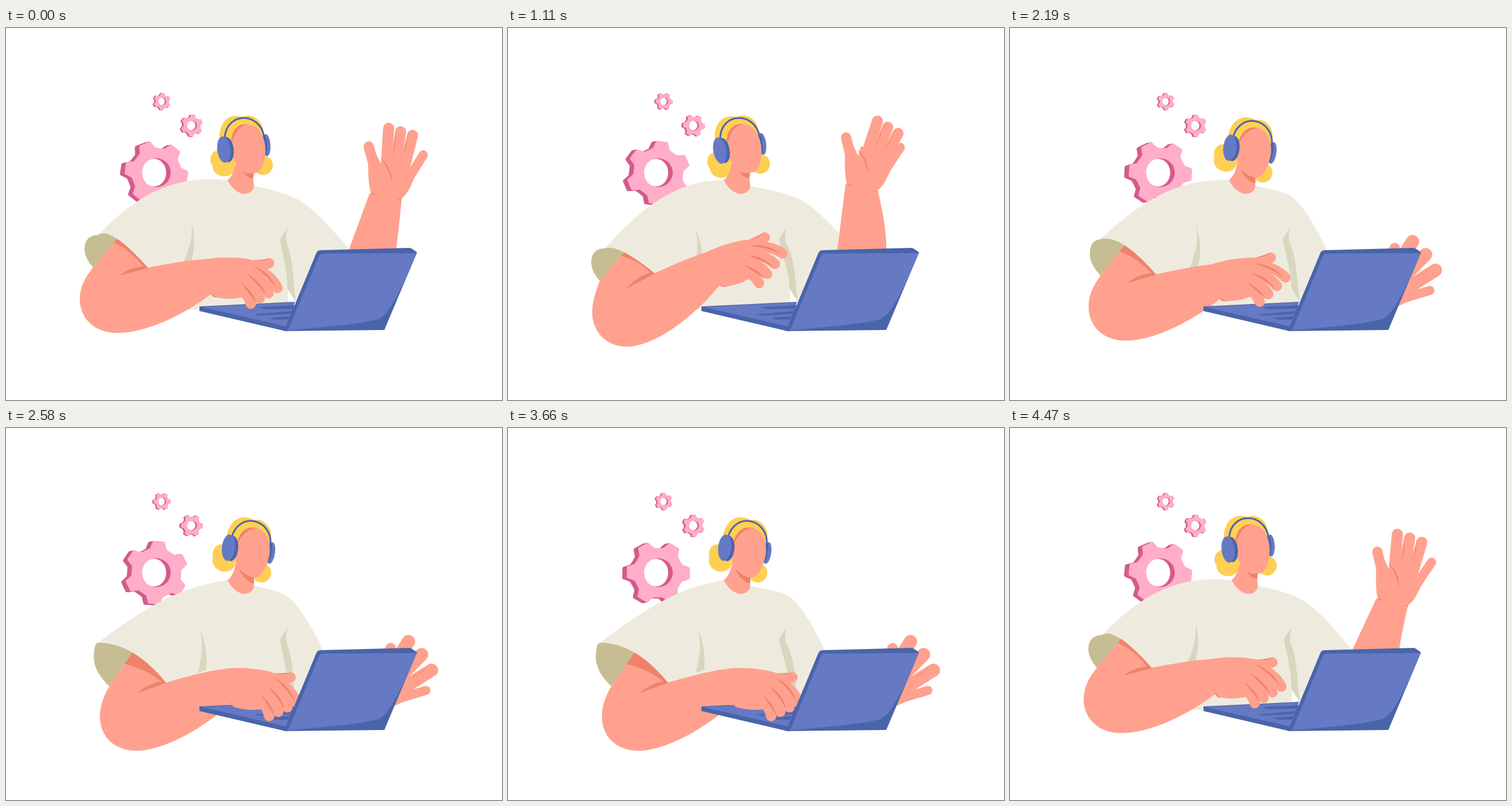
Write an HTML page with a canvas that moves like this. It is 864 px wide and 648 px high and loops after 4500 ms.

```html
<!DOCTYPE html>
<html lang="en">
<head>
<meta charset="utf-8">
<title>Support desk</title>
<style>
html, body { margin: 0; width: 100%; height: 100%; overflow: hidden; background: #fff; }
canvas { display: block; }
</style>
</head>
<body>
<canvas id="stage" width="864" height="648"></canvas>
<script>
const ctx = document.getElementById('stage').getContext('2d');
const LOOP = 4500;
const SKIN = '#ffa18e', SHADE = '#f0826a', SHIRT = '#eeebde', FOLD = '#d9d6c0', CUFF = '#c6bd93';
const HAIR = '#ffcf54', BLUE = '#6679c4', NAVY = '#4a64aa', PINK = '#ffadc8', ROSE = '#d45b8d';

const rad = deg => deg * Math.PI / 180;

function ease(u) {
  u = Math.min(1, Math.max(0, u));
  return u * u * (3 - 2 * u);
}

// Eases from 0 to 1 over a..b, stays, and eases back over c..d (d may pass the loop end).
function hold(t, a, b, c, d) {
  if (t < a) t += LOOP;
  return ease((t - a) / (b - a)) - ease((t - c) / (d - c));
}

function pose(t) {
  return {
    lift: hold(t, 0, 450, 1050, 1800),
    tilt: hold(t, 0, 480, 600, 1100),
    away: hold(t, 600, 1100, 1150, 1650),
    low: hold(t, 1150, 1700, 4050, 4590),
    reach: hold(t, 2000, 2500, 2650, 3150) + hold(t, 3300, 3650, 3750, 4250),
    lean: -10 * (hold(t, 100, 700, 1900, 2450) + hold(t, 2900, 3500, 3750, 4300))
  };
}

function fill(color, d) {
  ctx.fillStyle = color;
  ctx.fill(new Path2D(d));
}

function line(color, width, d) {
  ctx.strokeStyle = color;
  ctx.lineWidth = width;
  ctx.lineCap = ctx.lineJoin = 'round';
  ctx.stroke(new Path2D(d));
}

function oval(color, x, y, rx, ry, tilt = 0) {
  ctx.fillStyle = color;
  ctx.beginPath();
  ctx.ellipse(x, y, rx, ry, rad(tilt), 0, 7);
  ctx.fill();
}

// Thin tapered line.
function crease(x0, y0, cx, cy, x1, y1, w = 5) {
  fill(SHADE, `M${x0} ${y0}Q${cx} ${cy} ${x1} ${y1}Q${cx - w} ${cy + w} ${x0} ${y0}Z`);
}

// Moves pivot (px,py) to (x,y), turned by an angle.
function placed(x, y, deg, px, py, draw) {
  ctx.save();
  ctx.translate(x, y);
  ctx.rotate(rad(deg));
  ctx.translate(-px, -py);
  draw();
  ctx.restore();
}

// Point (a,b) in a frame at (x,y) turned by an angle.
function local(x, y, deg, a, b) {
  const c = Math.cos(rad(deg)), s = Math.sin(rad(deg));
  return [x + a * c - b * s, y + a * s + b * c];
}

function gear(x, y, size, deg) {
  const at = (r, a) => local(0, 0, a, r, 0).join(' ');
  let d = '';
  for (let i = 0; i < 6; i++) {
    const a = deg + i * 60;
    d += `${i ? 'L' : 'M'}${at(42, a - 17)}L${at(53, a - 9)}L${at(53, a + 9)}L${at(42, a + 17)}Q${at(40, a + 30)} ${at(42, a + 43)}`;
  }
  d += 'Z';
  ctx.save();
  ctx.translate(x, y);
  ctx.scale(size, size);
  for (let depth = 8; depth >= 0; depth--) {
    const color = depth ? ROSE : PINK;
    ctx.save();
    ctx.translate(-depth, depth / 5);
    fill(color, d);
    line(color, 5, d);
    ctx.restore();
  }
  oval(ROSE, 0, 0, 25, 25);
  oval('#fff', -4, 0, 21, 24);
  ctx.restore();
}

// Everything on the left arm hangs on the elbow crease.
function leftArm({ lift, low, reach, away, tilt }) {
  const x = 198 + 8 * lift + 36 * reach - 5 * low;
  const y = 431 + 24 * lift + 26 * reach + 5 * low;
  const turn = -14 * lift - 5 * reach;
  const raise = away + low * (1 - reach);
  const top = [x - 37 - 32 * reach, y - 71 - 17 * reach];
  const edge = [x - 4 - 5 * reach, y - 64 - 7 * reach];
  const armpit = [x + 50, y - 13 + turn];
  const bend = edge.map((e, i) => 2 * e - (top[i] + armpit[i]) / 2);
  const towards = p => p.map((v, i) => (v + bend[i]) / 2);
  return {
    x, y, turn, raise, top, edge, armpit, bend,
    left: [x - 61 - 15 * reach, y - 45 - 16 * reach],
    under: [x - 46 - 3 * reach, y - 14 + 2 * reach],
    upper: `Q${towards(top)} ${top}`,
    lower: `Q${towards(armpit)} ${armpit}`,
    depth: .13 + .21 * reach,
    wrist: local(x, y, turn, 160, 31),
    handTurn: -20 * raise - 6 * tilt + 3 * reach
  };
}

function shirt({ lift, low, reach, lean, tilt }, arm) {
  const nx = 386 + lean, ny = 265 + 4 * tilt;
  fill(SHIRT, `M${arm.top}C${215 + 12 * reach} ${305 + 30 * lift + 20 * reach} ${280 + 10 * reach} ${253 + 11 * lift + 25 * reach} ${nx} ${ny}
    L${nx + 46} ${ny + 10}
    C${nx + 80} ${ny + 17} ${495 - 20 * low} ${290 - 5 * low} ${515 - 25 * low} ${302 - 9 * low}
    C${545 - 33 * low} ${322 - 12 * low} ${575 - 40 * low} ${355 - 5 * low} ${602 - 49 * low} ${386 + 4 * low}
    L545 450L505 478L491 ${455 + 23 * low}V482L337 491H318L${arm.armpit}Q${arm.bend} ${arm.top}Z`);
  placed(323 + .7 * lean + 10 * lift + 14 * reach, 338 + 11 * lift + 8 * reach + 4 * low, -10 * (lift + reach), 0, 0,
    () => fill(FOLD, 'M0 0C6 22 7 45-1 72L-16 75C-3 45 3 25 0 0Z'));
  const x = 491 + lean / 2, y = 347;
  fill(FOLD, `M${x} ${y}L${x - 14} ${y + 20}C${x - 8} ${y + 55} 490 420 490 453L505 477C499 430 500 400 ${x - 3} ${y + 25}Q${x - 4} ${y + 16} ${x} ${y}Z`);
}

function head({ lean, low, tilt, away }) {
  const turn = 14 * low + 3 * tilt - 2 * away;
  const x = 422 + lean + 8 * low, y = 209 + 7 * low + 4 * tilt;
  placed(x, y, turn * 1.4, 422, 209, () => {
    oval(HAIR, 370, 230, 14, 16);
    oval(HAIR, 380, 242, 20, 17);
    oval(HAIR, 448, 238, 17, 17);
  });
  ctx.save();
  ctx.translate(386 + lean, 265 + 4 * tilt);
  fill(SKIN, 'M0 0C8-7 13-17 14-32L46-32C44-15 44-3 46 10C44 28 16 32 0 0Z');
  fill(SHADE, `M${27 - 7 * low} ${-16 - 3 * low}Q36 -8 46 ${-14 + 8 * low}L${44 + 2 * low} ${-3 + 9 * low}Q${32 - 3 * low} ${-5 + 6 * low} ${27 - 7 * low} ${-16 - 3 * low}Z`);
  ctx.restore();
  placed(x, y, turn, 422, 209, () => {
    fill(HAIR, 'M371 192C370 165 385 152 402 153Q409 154 412 154C420 150 430 153 436 158C446 165 448 178 449 195L440 215L397 236L380 230Z');
    oval(BLUE, 453, 203, 7, 19, -5);
    oval(NAVY, 450, 203, 4, 18, -5);
    fill(SKIN, 'M391 205C391 180 402 167 418 167C436 167 448 183 451 205C453 230 446 252 433 252C412 253 392 235 391 205Z');
    fill(SHADE, 'M391 207C390 180 401 166 419 167C405 171 396 183 391 207Z');
    line(NAVY, 3, 'M380 192C382 145 442 145 449 190');
    oval(NAVY, 385, 212, 11, 22, -8);
    oval(BLUE, 379, 212, 11.5, 23, -8);
  });
}

function wavingArm({ low, tilt, away }) {
  const x = 660 + 5 * tilt - 35 * away + 140 * low * (1 - low) + 3 * low;
  const y = 245 + 8 * tilt + 203 * low;
  const turn = 45 * low - 3 + 13 * tilt + 5 * away;
  const spread = 6 * tilt + 12 * away - 6 * low;
  const elbow = 641 - 4 * tilt - 23 * away - 40 * low;
  fill(SKIN, `M${local(x, y, turn, -36, 28)}L${elbow - 46} 400H${elbow + 40}Q${elbow + 45} 360 ${local(x, y, turn, 20, 36)}Z`);
  placed(x, y, turn, 668, 260, () => {
    fill(SKIN, 'M629 225L643 220L652 238L656 222L702 222L702 248L718 240C708 262 702 287 688 297C675 302 650 299 635 289C631 280 629 262 629 225Z');
    line(SKIN, 18, 'M630 207L642 250');
    line(SKIN, 16, 'M725 221L700 262');
    for (let i = -1; i < 2; i++) {
      placed(668, 260, spread + 8 * low * i, 668, 260, () => {
        const tip = 686 + 20 * i, base = 677 + 16 * i;
        line(SKIN, 19 + 4 * low, `M${tip} ${181 + 6 * i}L${base} 240`);
        if (i >= 0) crease(tip - 8, 181 + 6 * i, tip - 8, 208, base - 6, 226, 3);
      });
    }
    crease(650, 226, 672, 244, 670, 269, 4);
    crease(634, 286, 639, 290, 645, 291, 3);
    crease(690, 298, 685, 297, 679, 299, 3);
  });
}

function typingArm({ x, y, turn, top, left, under, edge, armpit, upper, lower, depth }) {
  fill(CUFF, `M${top}Q${left[0]} ${top[1] + 1} ${left}Q${left[0] + 1} ${(left[1] + under[1]) / 2} ${under}L${edge}${upper}Z`);
  const at = (a, b) => local(x, y, turn, a, b);
  fill(SKIN, `M${under}L${edge}${lower}L${x} ${y}L${at(-40, 60)}L${at(-69, 39)}Q${at(-69, 14)} ${under}Z`);
  placed(x, y, turn, 198, 431, () =>
    fill(SKIN, 'M198 431L248 417C290 409 320 404 350 402L368 430L358 463C312 498 245 531 195 531C152 531 128 503 129 470Z'));
  const shade = edge.map((e, i) => e + (under[i] - e) * depth);
  const mid = shade.map((s, i) => (s + armpit[i]) / 2 - 8 * i);
  fill(SHADE, `M${edge}${lower}L${armpit[0] - 8} ${armpit[1] - 2}Q${mid} ${shade}Z`);
  const mx = (x + armpit[0]) / 2, my = (y + armpit[1]) / 2;
  fill(SHADE, `M${x} ${y}Q${mx - 6} ${my - 9} ${armpit[0] - 4} ${armpit[1] - 3}L${armpit}Q${mx} ${my} ${x} ${y}Z`);
}

function typingHand({ wrist, handTurn, raise }) {
  placed(...wrist, handTurn, 358, 462, () => {
    fill(SKIN, `M330 432L345 403C360 400 385 399 400 401C415 402 430 404 442 410L450 440L422 470L405 471
      C395 473 380 472 372 470C365 470 360 467 358 463L340 466Z`);
    line(SKIN, 18, 'M425 415Q445 416 460 412');
    crease(433, 406, 448, 409, 462, 404, -3);
    for (let i = 3; i >= 0; i--) {
      const bx = 441 - 11 * i, by = 423 + 10 * i;
      placed(bx, by, 6 * raise * (i - 2), bx, by, () => {
        line(SKIN, 18, `M${bx} ${by}Q${464 - 14 * i} ${435 + 10 * i} ${473 - 15.5 * i} ${456 + 8.5 * i}`);
        if (i < 3) crease(431 - 10.5 * i, 414 + 15.5 * i, 461 - 15.5 * i, 428 + 16 * i, 470 - 17 * i, 455 + 13 * i);
      });
    }
    fill(SHADE, 'M357 459Q360 465 367 469Q358 469 357 459Z');
  });
}

function laptopBase() {
  fill(NAVY, 'M337 485L503 477L492 528L487 528L337 493Z');
  fill(BLUE, 'M340 486L503 478L488 520Z');
  fill(NAVY, 'M440 486L503 483L500 489L452 490ZM433 499L498 493L495 498L440 501ZM459 505L494 502L491 508L466 508Z');
}

function laptopScreen() {
  fill(NAVY, 'M541 391Q543 387 549 387L703 383Q706 383 716 391L659 526L484 528Z');
  fill(BLUE, 'M552 393L715 392L698 433C680 470 665 500 649 507C610 518 540 521 491 527L545 398Q547 393 552 393Z');
}

function frame(now) {
  const t = now % LOOP, spin = 360 * t / LOOP;
  const body = pose(t), arm = leftArm(body);
  ctx.clearRect(0, 0, 864, 648);
  gear(272, 128, .27, 33 + spin);
  gear(324, 170, .345, 35 + spin);
  gear(262, 252, 1, 8 + spin);
  shirt(body, arm);
  head(body);
  wavingArm(body);
  typingArm(arm);
  laptopBase();
  typingHand(arm);
  laptopScreen();
  requestAnimationFrame(frame);
}
requestAnimationFrame(frame);
</script>
</body>
</html>
```
